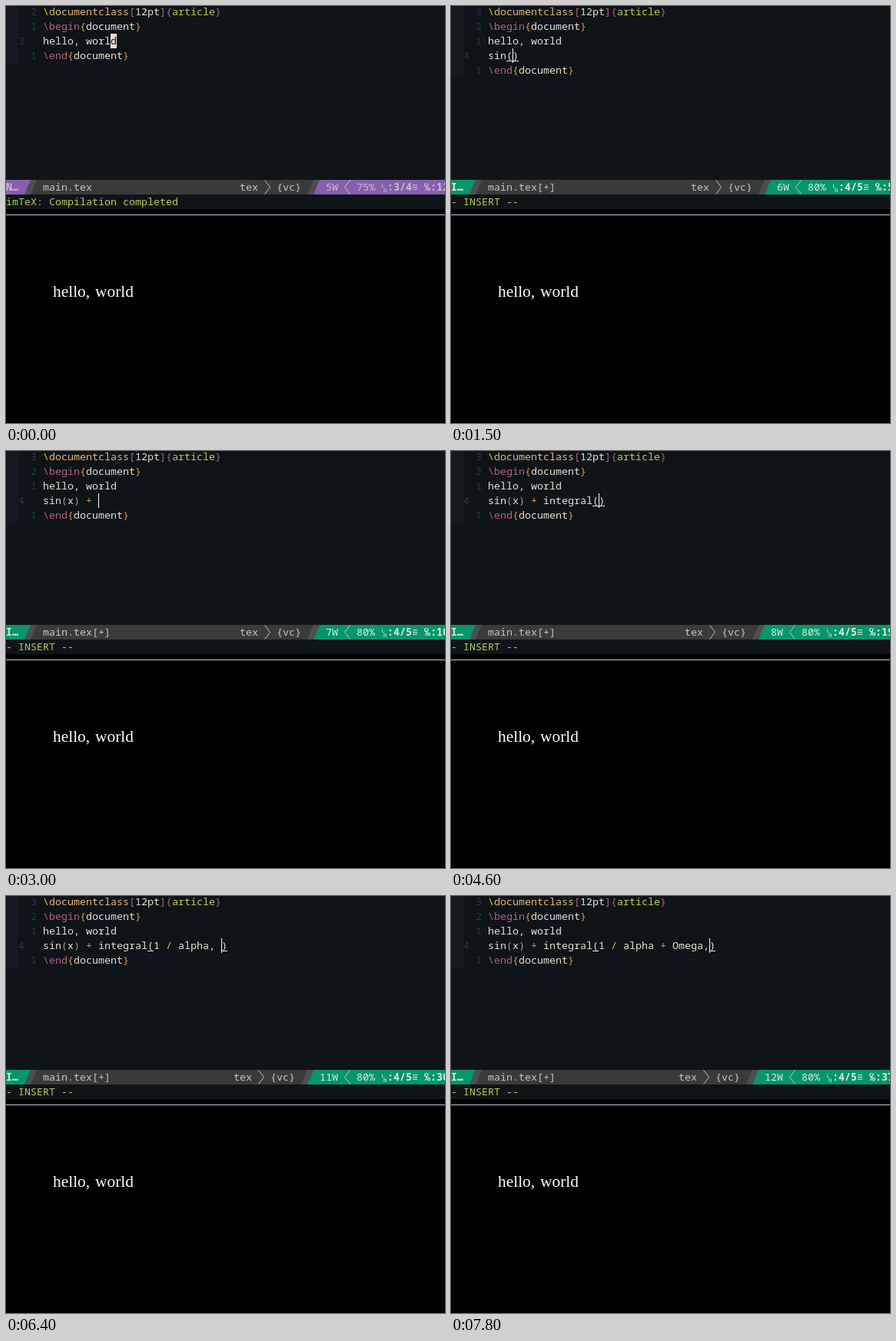
These frames come from a looping animation (571x542 px, 8000 ms). An HTML page:

```html
<!DOCTYPE html>
<html lang="en">
<head>
<meta charset="utf-8">
<title>Typing in an editor</title>
<style>
  html, body { margin: 0; width: 100%; height: 100%; overflow: hidden; background: #000; }
  svg { display: block; width: 100vw; height: 100vh; }
  text { white-space: pre; font: 500 13.333px "Noto Sans Mono", "DejaVu Sans Mono", monospace; font-variant-ligatures: none; }
  .bold { font-weight: 700; }
  .page { font: 21.4px "Liberation Serif", "Noto Serif", serif; }
</style>
</head>
<body>
<svg id="stage" viewBox="0 0 571 542" preserveAspectRatio="none"></svg>
<script>
const LOOP = 8000, CELL = 8, ROW = 19, TOP = -2, LEFT = 48;
const C = {
  bg: '#0f1419', sign: '#14191f', number: '#2d3640', fg: '#e6e1cf', paren: '#a3a092',
  command: '#e6b673', slash: '#e7c547', pink: '#b8607c', orange: '#e59645',
  green: '#b8cc52', bar: '#3a3a3a', band: '#4e4e4e', barText: '#c6c6c6',
};
const MODES = {
  N: { label: 'N…', fill: '#875faf', ink: '#c6c0ca' },
  I: { label: 'I…', fill: '#059669', ink: '#dcebe2' },
};
const DONE = 'imTeX: Compilation completed', INSERT = '- INSERT --';
const CALL = 'sin(x) + integral(', SUM = CALL + '1 / alpha';

// time, text before the cursor, text after it, mode, message
const steps = [
  [0, 'hello, worl', 'd', 'N', DONE],
  [900, 'hello, world'],
  [1000, ''], [1100, 's'], [1200, 'si'], [1300, 'sin'],
  [1500, 'sin(', ')'], [1800, 'sin(x', ')'], [1900, 'sin(x', ')', 'I', ''],
  [2000, 'sin(', 'x)', 'N', ''], [2100, 'sin(x', ')', 'N', ''],
  [2300, 'sin(x)', '', 'I', ''], [2400, 'sin(x)'], [2700, 'sin(x) '],
  [2900, 'sin(x) +'], [3000, 'sin(x) + '],
  [3200, 'sin(x) + i'], [3300, 'sin(x) + int'], [3400, 'sin(x) + integ'],
  [3600, 'sin(x) + integr'], [3700, 'sin(x) + integral'],
  [4600, CALL, ')'], [4800, CALL + '1', ')'], [5000, CALL + '1 ', ')'],
  [5200, CALL + '1 /', ')'], [5300, CALL + '1 / ', ')'], [5400, CALL + '1 / a', ')'],
  [5600, CALL + '1 / alp', ')'], [6000, CALL + '1 / alph', ')'],
  [6100, SUM, ')'], [6200, SUM + ',', ')'], [6400, SUM + ', ', ')'],
  [6600, SUM + ',', ')'], [6800, SUM, ')'], [6900, SUM + ' ', ')'],
  [7000, SUM + ' +', ')'], [7100, SUM + ' + ', ')'], [7200, SUM + ' + O', ')'],
  [7500, SUM + ' + Om', ')'], [7600, SUM + ' + Ome', ')'],
  [7700, SUM + ' + Omega', ')'], [7800, SUM + ' + Omega,', ')'],
];

const rowY = row => TOP + row * ROW;
const rect = (x, y, w, h, fill) => `<rect x="${x}" y="${y}" width="${w}" height="${h}" fill="${fill}"/>`;
const poly = (points, fill) => `<polygon points="${points}" fill="${fill}"/>`;
const write = (x, row, str, fill, cls = '') =>
  `<text x="${x}" y="${rowY(row) + 14}" fill="${fill}" class="${cls}">${str}</text>`;

function spans(row, parts) {
  let x = LEFT, out = '';
  for (const [str, fill] of parts) {
    out += write(x, row, str, fill);
    x += str.length * CELL;
  }
  return out;
}

function environment(row, name) {
  return spans(row, [['\\' + name, C.pink], ['{', C.orange], ['document', C.fg], ['}', C.orange]]);
}

// indexes of the bracket at the cursor and its partner
function bracketPair(line, at, mode) {
  const isBracket = i => line[i] === '(' || line[i] === ')';
  const i = isBracket(at) ? at : mode === 'I' && isBracket(at - 1) ? at - 1 : -1;
  if (i < 0) return [];
  return [i, line[i] === '(' ? line.indexOf(')', i) : line.lastIndexOf('(', i)];
}

function editedLine(row, before, after, mode) {
  const line = before + after, at = before.length, y = rowY(row);
  const pair = bracketPair(line, at, mode);
  const tint = { '(': C.paren, ')': C.paren, '+': C.orange, '/': C.slash };
  const x = LEFT + at * CELL;
  let out = mode === 'N' ? rect(x, y, CELL, ROW, C.fg) : '';
  [...line].forEach((ch, i) => {
    const cx = LEFT + i * CELL, matched = pair.includes(i), under = mode === 'N' && i === at;
    if (ch !== ' ') out += write(cx, row, ch, under ? C.bg : matched ? C.fg : tint[ch] || C.fg);
    if (matched && !under) out += rect(cx, y + 16, CELL, 1, C.fg);
  });
  return out + (mode === 'I' ? rect(x, y, 1, ROW, '#fff') : '');
}

function lineNumbers(count, current) {
  let out = rect(0, 0, 16, rowY(count), C.sign);
  for (let i = 0; i < count; i++) {
    out += i === current ? write(16, i, i + 1, C.number)
                         : write(32, i, Math.abs(i - current), C.number);
  }
  return out;
}

function chevron(x, dir) {
  const [a, b] = dir > 0 ? [x + 0.5, x + 7.5] : [x + 7.5, x + 0.5];
  return `<path d="M${a} 226.5L${b} 235.5L${a} 244.5" fill="none" stroke="${C.barText}"/>`;
}

function lineMark(x, ink) {
  const small = (dx, y, ch) => `<text x="${x + dx}" y="${y}" fill="${ink}" style="font-size:7px">${ch}</text>`;
  return small(0.5, 236, 'L') + small(3, 242, 'N');
}

function statusBar(mode, lines, row, col, words, changed) {
  const { label, fill, ink } = MODES[mode];
  const y = rowY(12), end = y + ROW;
  const right = 456 + (col < 10 ? CELL : 0);
  const info = right - (words < 10 ? 40 : 48);
  const edge = info - CELL;
  const type = info - 112;
  const percent = Math.floor((row + 1) / lines * 100);
  return rect(0, y, 571, ROW, C.bar)
    + poly(`0,${y} 40,${y} 32,${end} 0,${end}`, C.band)
    + poly(`0,${y} 32,${y} 24,${end} 0,${end}`, fill)
    + poly(`${edge - 8},${y} 571,${y} 571,${end} ${edge - 16},${end}`, C.band)
    + poly(`${edge},${y} 571,${y} 571,${end} ${edge - 8},${end}`, fill)
    + write(0, 12, label, ink, 'bold')
    + write(LEFT, 12, 'main.tex' + (changed ? '[+]' : ''), C.barText)
    + write(type, 12, 'tex', C.barText) + chevron(type + 32, 1)
    + write(type + 48, 12, '{vc}', C.barText)
    + write(info, 12, words + 'W', ink) + chevron(right - 16, -1)
    + write(right, 12, percent + '%', ink) + lineMark(right + 32, ink)
    + write(right + 40, 12, `:${row + 1}/${lines}`, ink, 'bold')
    + write(right + 72, 12, '≡', ink)
    + write(right + 88, 12, '℅', ink, 'bold')
    + write(right + 96, 12, ':' + col, ink, 'bold');
}

function preview() {
  const word = (x, str) => `<text class="page" x="${x}" y="378" fill="#fff">${str}</text>`;
  return rect(0, 264, 571, 278, '#000') + rect(0, 271, 571, 1, '#cdb9e2')
    + word(61, 'hello,') + word(116, 'world');
}

function render([time, before, after = '', mode = 'I', message = INSERT]) {
  const opened = time >= 1000;
  const lines = opened ? 5 : 4, row = opened ? 3 : 2;
  const typed = opened ? (before + after).split(/\s+/).filter(Boolean).length : 0;
  return rect(0, 0, 571, 264, C.bg)
    + lineNumbers(lines, row)
    + spans(0, [['\\', C.slash], ['documentclass', C.command], ['[', C.pink], ['12pt', C.fg],
                [']', C.pink], ['{', C.pink], ['article', C.green], ['}', C.pink]])
    + environment(1, 'begin')
    + (opened ? spans(2, [['hello, world', C.fg]]) : '')
    + editedLine(row, before, after, mode)
    + environment(lines - 1, 'end')
    + statusBar(mode, lines, row, before.length + 1, 5 + typed, opened)
    + write(0, 13, message, C.green)
    + preview();
}

const stage = document.getElementById('stage');
const start = performance.now();
let shown = null;

function tick() {
  const t = (performance.now() - start) % LOOP;
  const step = steps.findLast(s => s[0] <= t);
  if (step !== shown) stage.innerHTML = render(shown = step);
  requestAnimationFrame(tick);
}
tick();
</script>
</body>
</html>
```
